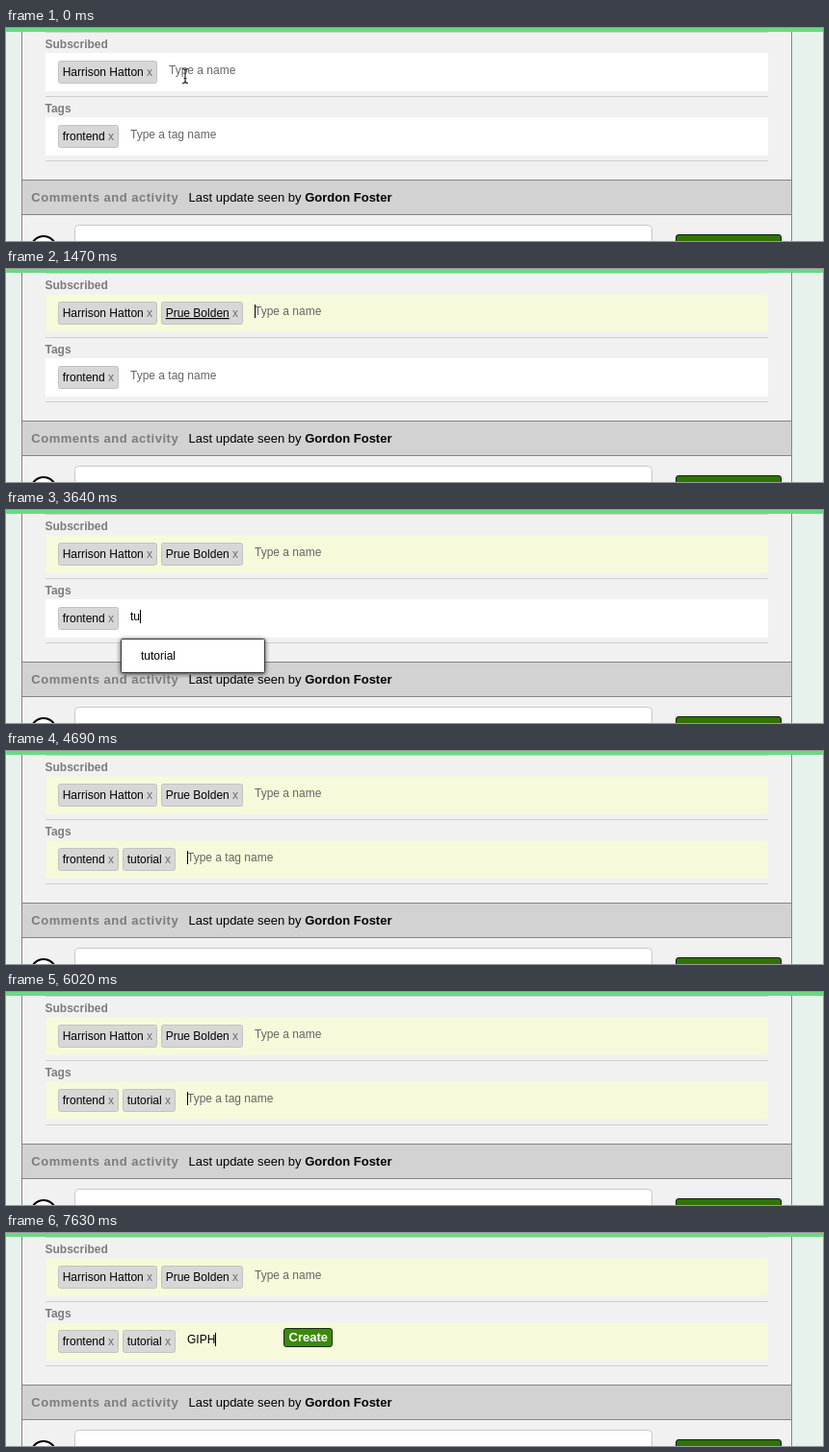
Animation, 848 px wide and 222 px high, one loop 8000 ms. Source, as an HTML page:

```html
<!DOCTYPE html>
<html lang="en">
<head>
<meta charset="utf-8">
<title>Subscribers and tags</title>
<style>
html, body { margin: 0; width: 100%; height: 100%; overflow: hidden; background: #e8f2ec; }
svg { display: block; width: 848px; height: 222px; }
text { font: 12px "Liberation Sans", Arial, sans-serif; fill: #000; white-space: pre; }
.label { font-weight: bold; fill: #7c7c7c; }
.hint { fill: #666; }
.close { fill: #6c6c6c; }
.head { font-size: 13px; }
.bold { font-weight: bold; }
.link { text-decoration: underline; }
.menu { filter: drop-shadow(0 1px 2.5px rgba(0, 0, 0, .75)); }
</style>
</head>
<body>
<svg viewBox="0 0 848 222" xmlns="http://www.w3.org/2000/svg">
  <rect width="848" height="222" fill="#e8f2ec"/>
  <rect x="16.5" y="-2" width="799" height="230" fill="#f1f1f1" stroke="#858585"/>
  <path d="M41 4.5H791M41 71.5H791M41 138.5H791" stroke="#cfcfcf"/>
  <rect width="848" height="4" fill="#6bd982"/>
  <text class="label" x="40.5" y="21">Subscribed</text>
  <text class="label" x="40.5" y="88">Tags</text>
  <rect x="16.5" y="158.5" width="799" height="36" fill="#d2d2d2" stroke="#858585"/>
  <text class="head label" x="26.3" y="181" letter-spacing=".5">Comments and activity</text>
  <text class="head" x="189.5" y="181">Last update seen by <tspan class="bold">Gordon Foster</tspan></text>
  <circle cx="39" cy="230" r="13" fill="#fff" stroke="#000" stroke-width="2"/>
  <rect x="71.5" y="205.5" width="599" height="40" rx="4" fill="#fff" stroke="#c8c8c8"/>
  <rect x="695.5" y="215.5" width="109" height="30" rx="2.5" fill="#2f7402" stroke="#0f1a08"/>
  <g id="live"></g>
  <g id="mouse"></g>
  <text id="ruler" visibility="hidden"></text>
</svg>
<script>
const LOOP = 8000, TICK = 70, PITCH = 33.5;
const live = document.getElementById('live');
const mouse = document.getElementById('mouse');
const ruler = document.getElementById('ruler');
const FIRST = 'Harrison Hatton', SECOND = 'Prue Bolden';

// Each step changes only the listed fields; beat is the start of the caret's blink.
const steps = [
  [0, { names: [FIRST], tags: ['frontend'], namesDone: 0, tagsDone: 0, focus: 'none',
        typed: '', menu: [], picked: false, link: '', create: false, beat: 0 }],
  [420, { focus: 'names', typed: 'P', beat: 420 }],
  [490, { menu: [SECOND, 'Paul Danvers'] }],
  [910, { typed: SECOND, picked: true, beat: 700 }],
  [1470, { names: [FIRST, SECOND], namesDone: 1, typed: '', menu: [], picked: false, link: SECOND, beat: 1470 }],
  [2030, { link: '' }],
  [2660, { focus: 'tags', beat: 2730 }],
  [3220, { typed: 't', beat: 3220 }],
  [3290, { menu: ['testing', 'tutorial', 'content', 'layout'] }],
  [3640, { typed: 'tu', menu: ['tutorial'], beat: 3640 }],
  [4200, { typed: 'tutorial', picked: true, beat: 4200 }],
  [4690, { tags: ['frontend', 'tutorial'], tagsDone: 1, typed: '', menu: [], picked: false, beat: 4900 }],
  [6160, { typed: 'G', menu: ['g', 'GS', 'GIF', 'design'], beat: 6160 }],
  [6930, { typed: 'GI', menu: ['GIF', 'login', 'plugin'], beat: 6930 }],
  [7210, { typed: 'GIP', menu: [], beat: 7210 }],
  [7350, { create: true }],
  [7420, { typed: 'GIPH', beat: 7420 }]
];

const stateAt = t => Object.assign({}, ...steps.filter(s => s[0] <= t).map(s => s[1]));

const widths = {};
function measure(str) {
  if (!(str in widths)) {
    ruler.textContent = str;
    widths[str] = ruler.getComputedTextLength();
  }
  return widths[str];
}

const text = (x, y, str, cls = '') => `<text class="${cls}" x="${x}" y="${y}">${str}</text>`;
const rect = (x, y, w, h, fill, more = '') =>
  `<rect x="${x}" y="${y}" width="${w}" height="${h}" fill="${fill}" ${more}/>`;

function chip(x, y, w, label, link) {
  return rect(x + .5, y + .5, w - 1, 23, '#d7d7d7', 'rx="2" stroke="#c2c2c2"') +
    text(x + 4.7, y + 16, label, link === label ? 'link' : '') +
    text(x + w - 11, y + 16, 'x', 'close');
}

function menuBox(x, y, items, picked) {
  const h = items.length * PITCH + 1.5;
  return '<g class="menu">' + rect(x - .5, y + .5, 149, h, '#fff', 'rx="1" stroke="#3a3a3a"') + '</g>' +
    (picked ? rect(x, y + 1, 148, 34, '#dcdcdc') : '') +
    items.map((item, i) => text(x + 20, y + 22 + i * PITCH, item)).join('');
}

function row(s, key, y, hint, t) {
  let out = s[key + 'Done']
    ? rect(41.5, y + .5, 749.5, 39, '#f7fada', 'rx="3"')
    : rect(41, y, 750, 40, '#fff');
  let x = 54;
  for (const label of s[key]) {
    const w = Math.round(measure(label)) + 19;
    out += chip(x, y + 8, w, label, s.link);
    x += w + 4;
  }
  x += 8;
  const focused = s.focus === key;
  const typed = focused ? s.typed : '';
  out += typed ? text(x, y + 22, typed) : text(x, y + 22, hint, 'hint');
  const lit = t - s.beat < 0 || (t - s.beat) % 1050 < 490;
  if (focused && lit) out += rect(Math.round(x + measure(typed)), y + 11, 1, 14, '#000');
  if (focused && s.create) {
    out += rect(x + 100.5, y + 6.5, 50, 19, '#3c8a0c', 'rx="2.5" stroke="#1c2b12"') +
      `<text class="head bold" x="${x + 105.5}" y="${y + 20}" style="fill:#fff">Create</text>`;
  }
  return { out, menu: focused && s.menu.length ? menuBox(x - 9, y + 41, s.menu, s.picked) : '' };
}

const BEAM = '<path d="M-3 -7.5Q0 -7.5 0 -5.5Q0 -7.5 3 -7.5M0 -6V6M-3 7.5Q0 7.5 0 5.5Q0 7.5 3 7.5M-1.5 2.5H1.5" ' +
  'fill="none" stroke="#222" stroke-width="1.2"/>';
const ARROW = '<path d="M0 0V13L3 10.2L5 15L7 14.2L5 9.5H9.2Z" fill="#000" stroke="#fff" stroke-width=".8"/>';

function drawMouse(t) {
  const shown = t < 420 || (t >= 1820 && t < 3220);
  if (!shown) return '';
  const p = Math.min(1, Math.max(0, (t - 1750) / 840));
  const u = p * p * (3 - 2 * p), v = 1 - u;
  const bezier = (a, b, c, d) => v * v * v * a + 3 * v * v * u * b + 3 * v * u * u * c + u * u * u * d;
  const x = t < 420 ? 186 : bezier(186, 206, 192, 174);
  const y = t < 420 ? 50 : bezier(50, 75, 142, 117);
  const overField = t < 420 || y > 93;
  return `<g transform="translate(${x.toFixed(1)} ${y.toFixed(1)})">${overField ? BEAM : ARROW}</g>`;
}

let last = '';
function draw(t) {
  const s = stateAt(t);
  const names = row(s, 'names', 26, 'Type a name', t);
  const tags = row(s, 'tags', 93, 'Type a tag name', t);
  const next = names.out + tags.out + names.menu + tags.menu;
  if (next !== last) live.innerHTML = last = next;
  mouse.innerHTML = drawMouse(t);
}

let start;
function loop(now) {
  start ??= now;
  const t = (now - start) % LOOP;
  draw(Math.floor(t / TICK) * TICK);
  requestAnimationFrame(loop);
}
draw(0);
requestAnimationFrame(loop);
</script>
</body>
</html>
```
